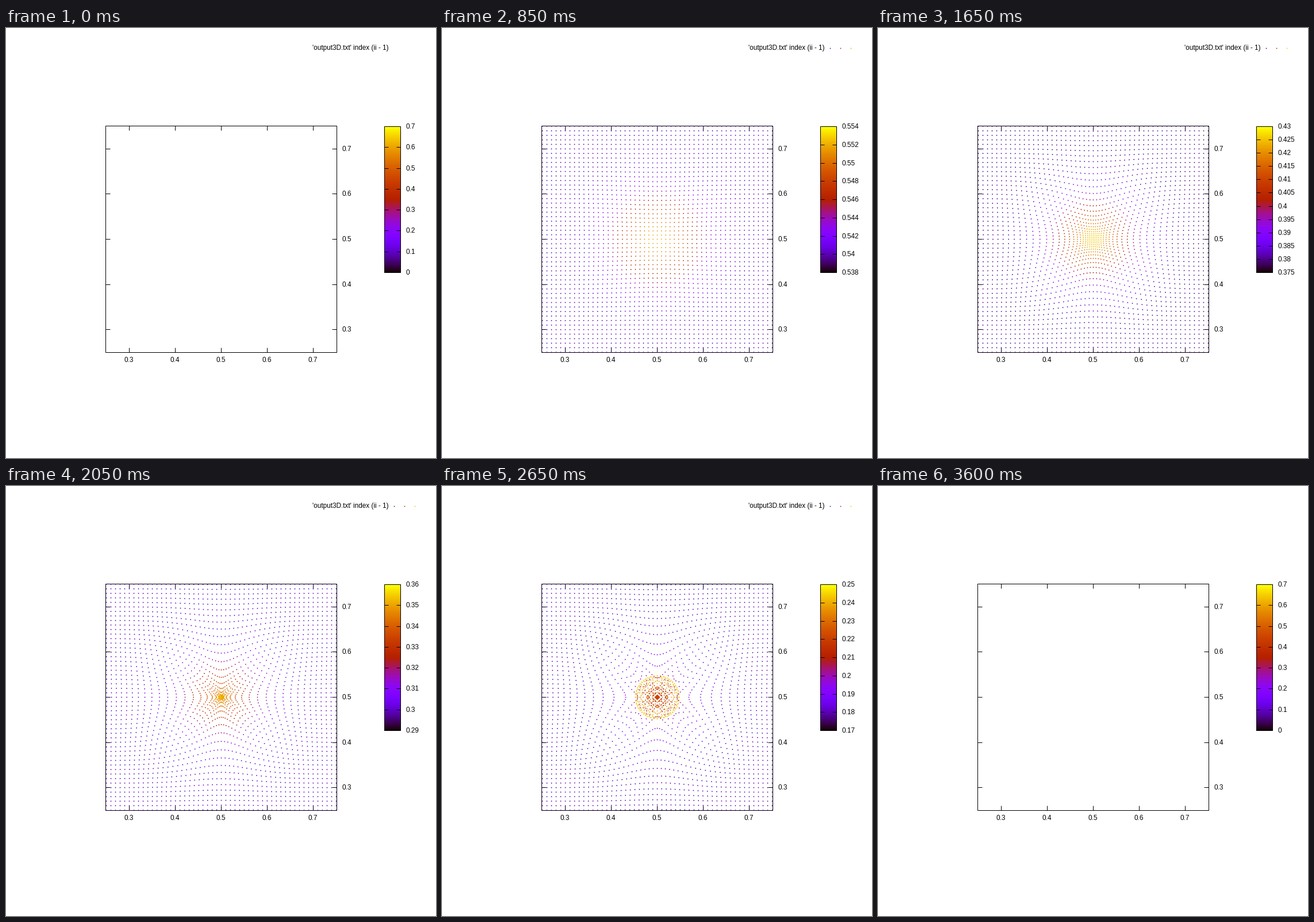
A matplotlib script for the animation above (3.65 s loop, 748x748 px).

```python
import math

import numpy as np
import matplotlib.pyplot as plt
from matplotlib.animation import FuncAnimation
from matplotlib.collections import LineCollection
from matplotlib.patches import Rectangle

SIZE, DPI = 748, 100
PX = 72 / DPI                       # one pixel in points
FRAMES, INTERVAL = 73, 50
STEP = 0.01                         # distance travelled per frame in free space
START_Z = 0.7
LENS_WIDTH, LENS_POWER = 0.097, 0.316
LEFT, RIGHT, TOP, BOTTOM = 173.5, 575.5, 170.5, 564.5
BAR_L, BAR_R, BAR_T, BAR_B = 658.5, 686.5, 171.5, 425.5
TICK, BAR_TICK = 8, 7
DOT = 1.8


def to_px(x, y):
    return 374.5 + 800 * (x - 0.5), 367.5 - 786 * (y - 0.5)


def palette(t):
    t = np.clip(t, 0, 1)
    blue = np.clip(np.sin(2 * np.pi * t), 0, 1)
    return np.stack([np.sqrt(t), t ** 3, blue], axis=-1)


# --- rays slowed and bent by a soft spherical lens -----------------------

def flow(pos, mom):
    d = pos - 0.5
    g = LENS_POWER * np.exp(-(d ** 2).sum(1, keepdims=True) / LENS_WIDTH ** 2)
    speed = 1 / (1 + g)
    size = np.linalg.norm(mom, axis=1, keepdims=True)
    return speed * mom / size, -size * speed ** 2 * g * 2 * d / LENS_WIDTH ** 2


def advance(pos, mom, h):
    a1, b1 = flow(pos, mom)
    a2, b2 = flow(pos + a1 * h / 2, mom + b1 * h / 2)
    a3, b3 = flow(pos + a2 * h / 2, mom + b2 * h / 2)
    a4, b4 = flow(pos + a3 * h, mom + b3 * h)
    return (pos + h / 6 * (a1 + 2 * a2 + 2 * a3 + a4),
            mom + h / 6 * (b1 + 2 * b2 + 2 * b3 + b4))


def trace(count, substeps=2):
    side = np.linspace(0.25, 0.75, 51)
    gx, gy = np.meshgrid(side, side, indexing="ij")
    pos = np.column_stack([gx.ravel(), gy.ravel(), np.full(gx.size, START_Z)])
    mom = np.zeros_like(pos)
    mom[:, 2] = -1
    sheets = [pos]
    for _ in range(count - 1):
        for _ in range(substeps):
            pos, mom = advance(pos, mom, STEP / substeps)
        sheets.append(pos)
    return sheets


# --- colour scale --------------------------------------------------------

def tick_step(span):
    power = 10.0 ** math.floor(math.log10(span))
    slots = 20 / (span / power)
    for limit, unit in ((40, 0.05), (20, 0.1), (10, 0.2), (4, 0.5), (2, 1)):
        if slots > limit:
            return unit * power
    return 2 * power


def color_range(lo, hi, widen):
    if hi - lo < 1e-9:
        lo, hi = 0.99 * lo, 1.01 * hi
    step = tick_step(hi - lo)
    first = math.floor(lo / step + (-1e-6 if widen else 1e-3))
    last = math.ceil(hi / step - 1e-6)
    return first, last, step


sheets = trace(FRAMES - 2)

fig = plt.figure(figsize=(SIZE / DPI, SIZE / DPI), dpi=DPI, facecolor="white")
ax = fig.add_axes([0, 0, 1, 1])
font = dict(family="Liberation Sans", size=11.8 * PX, color="black")
line = dict(linewidths=PX, colors="black", snap=False)


def label(x, y, s="", ha="left"):
    return ax.text(x, y, s, ha=ha, va="baseline", **font)


def frame_box(l, t, r, b):
    ax.add_patch(Rectangle((l, t), r - l, b - t, fill=False, ec="black",
                           lw=PX, snap=False, zorder=3))


ax.imshow(palette(np.linspace(1, 0, 254))[:, None, :], aspect="auto",
          extent=(BAR_L, BAR_R, BAR_B, BAR_T), interpolation="nearest")
frame_box(LEFT, TOP, RIGHT, BOTTOM)
frame_box(BAR_L, BAR_T, BAR_R, BAR_B)

ticks = []
for v in (0.3, 0.4, 0.5, 0.6, 0.7):
    x, y = (math.floor(c + 0.01) + 0.5 for c in to_px(v, v))
    ticks += [[(x, TOP), (x, TOP + TICK)], [(x, BOTTOM), (x, BOTTOM - TICK)],
              [(LEFT, y), (LEFT + TICK, y)], [(RIGHT, y), (RIGHT - TICK, y)]]
    label(x - 0.5, 581, f"{v:g}", "center")
    label(585, y + 3.5, f"{v:g}")
ax.add_collection(LineCollection(ticks, **line))

bar_ticks = LineCollection([], zorder=4, **line)
ax.add_collection(bar_ticks)
bar_labels = [label(696, 0) for _ in range(24)]
title = label(533, 38, "'output3D.txt' index (ii - 1)")


def dots():
    return ax.scatter([], [], s=(DOT * PX) ** 2, marker="o", linewidths=0,
                      zorder=5)


points, key = dots(), dots()
ax.set_xlim(0, SIZE)
ax.set_ylim(SIZE, 0)
ax.axis("off")


def draw_scale(first, last, step):
    lines = []
    for i, text in enumerate(bar_labels):
        n = first + i
        text.set_visible(n <= last)
        if n > last:
            continue
        y = BAR_B - (BAR_B - BAR_T) * i / (last - first)
        mid = math.floor(y) + 0.5
        lines += [[(BAR_L, mid), (BAR_L + BAR_TICK, mid)],
                  [(BAR_R, mid), (BAR_R - BAR_TICK, mid)]]
        text.set_position((696, mid + 3.5))
        text.set_text(f"{n * step:.6g}")
    bar_ticks.set_segments(lines)


def update(k):
    live = 0 < k < FRAMES - 1
    title.set_visible(k < FRAMES - 1)
    points.set_visible(live)
    key.set_visible(live)
    if not live:
        draw_scale(0, 7, 0.1)
        return []
    x, y, z = sheets[k - 1].T
    base = START_Z - STEP * (k - 1)
    top = max(z.max(), base)
    first, last, step = color_range(base, top, 1 < k < 55)
    draw_scale(first, last, step)

    def shade(v):
        return palette((v / step - first) / (last - first))

    points.set_offsets(np.column_stack(to_px(x, y)))
    points.set_facecolors(shade(z))
    key.set_offsets([(675.5, 35.5), (693.5, 35.5), (711.5, 35.5)])
    key.set_facecolors(shade(np.array([base, (base + top) / 2, top])))
    return []


anim = FuncAnimation(fig, update, frames=FRAMES, interval=INTERVAL,
                     init_func=lambda: update(0), repeat=True, repeat_delay=0)
plt.show()
```
